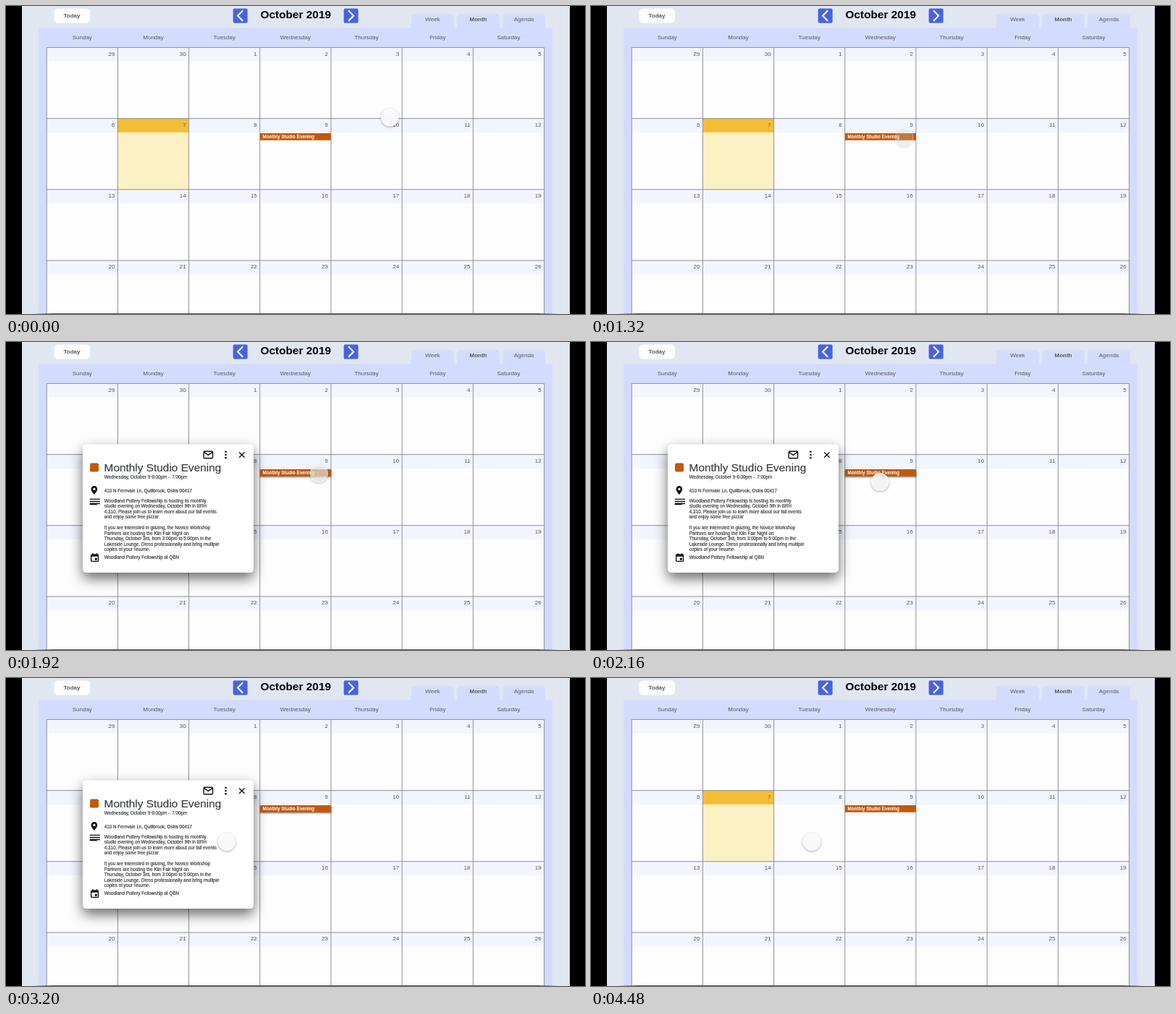
Animation of 800 by 426 pixels, one loop 4.52 s. Source, as an HTML page:

```html
<!DOCTYPE html>
<html lang="en">
<head>
<meta charset="utf-8">
<style>
  html, body { margin: 0; width: 100%; height: 100%; overflow: hidden; background: #000; }
  svg { display: block; width: 800px; height: 426px; font: 8px "Liberation Sans", Arial, sans-serif; }
  text { fill: #58585e; white-space: pre; }
  .mid { text-anchor: middle; }
  .end { text-anchor: end; }
  .bold { font-weight: bold; }
  #card { filter: drop-shadow(0 8px 9px rgba(0, 0, 0, .58)); }
  #card .small { font-size: 6.27px; fill: #333; stroke: #333; stroke-width: .16px; }
  #dot { filter: drop-shadow(0 1.5px 1.5px rgba(0, 0, 0, .35)); }
</style>
</head>
<body>
<svg viewBox="0 0 800 426">
  <defs>
    <linearGradient id="edge">
      <stop offset="0" stop-color="#555" stop-opacity="0"/>
      <stop offset=".04" stop-color="#555"/>
      <stop offset=".96" stop-color="#555"/>
      <stop offset="1" stop-color="#555" stop-opacity="0"/>
    </linearGradient>
  </defs>
  <rect x="22" width="757" height="426" fill="#e1e7f1"/>
  <rect x="45" y="30" width="710" height="396" fill="#d4dcfe"/>
  <rect x="66.5" y="3.5" width="49.5" height="20" rx="5" fill="#fdfdfd"/>
  <text class="mid bold" x="91" y="16">Today</text>
  <text class="mid bold" x="400.3" y="17.3" font-size="15.4" style="fill:#000">October 2019</text>
  <g id="nav"></g>
  <g id="grid"></g>
  <rect x="36" y="425" width="728" height="1" fill="url(#edge)"/>

  <rect id="lift" x="351" y="177.5" width="98.5" height="9.5" fill="#000" opacity=".35" style="filter:blur(1px)"/>
  <rect x="351" y="176" width="98" height="9.7" fill="#c1590c"/>
  <text class="bold" x="354.5" y="183" font-size="6.3" style="fill:#fff">Monthly Studio Evening</text>

  <g id="card">
    <rect x="106" y="141.5" width="236" height="177.5" rx="5" fill="#fff"/>
    <rect x="116" y="167.5" width="12" height="12" rx="2" fill="#c1590c"/>
    <text x="135.6" y="179" font-size="15.4" style="fill:#3c4043;stroke:#3c4043;stroke-width:.2px">Monthly Studio Evening</text>
    <g fill="none" stroke="#111" stroke-width="1.4">
      <rect x="273.2" y="151.2" width="12.4" height="9.6" rx="1"/>
      <path d="M273.5 152.4l5.9 4 5.9-4M322.2 152.4l7.4 7.4M329.6 152.4l-7.4 7.4"/>
      <path d="M115.7 217.4h14.3M115.7 220.5h14.3M115.7 223.5h14.3M115.7 226h0"/>
      <path d="M115.7 224.6h10"/>
      <rect x="117.7" y="294" width="9.8" height="9.4" rx="1"/>
      <path d="M117.5 295.4h10.2" stroke-width="2.6"/>
      <path d="M119.8 292.3v2M125.4 292.3v2"/>
    </g>
    <g fill="#111">
      <circle cx="303.5" cy="151.8" r="1.3"/>
      <circle cx="303.5" cy="156" r="1.3"/>
      <circle cx="303.5" cy="160.2" r="1.3"/>
      <rect x="122.8" y="298.7" width="3" height="3"/>
      <path fill-rule="evenodd" d="M121.9 211.2c-3-3.7-4.3-5.9-4.3-7.8a4.3 4.3 0 0 1 8.6 0c0 1.9-1.3 4.1-4.3 7.8zM120.3 203.4a1.6 1.6 0 0 0 3.2 0a1.6 1.6 0 0 0-3.2 0z"/>
    </g>
  </g>

  <circle id="dot" r="12.3" stroke="#fff" stroke-opacity=".55" stroke-width=".8"/>
</svg>
<script>
const $ = id => document.getElementById(id);
const rect = (x, y, w, h, fill, rx = 0) =>
  `<rect x="${x}" y="${y}" width="${w}" height="${h}" rx="${rx}" fill="${fill}"/>`;
const label = (x, y, text, cls = '') => `<text class="${cls}" x="${x}" y="${y}">${text}</text>`;

// Month arrows and view tabs
let nav = '';
for (const [x, dir] of [[323.7, -1], [476.7, 1]])
  nav += rect(x - 10, 3.5, 20, 20, '#4762e8', 2) +
    `<path d="M${x - 3.5 * dir} 6.2l${7 * dir} 7.3l${-7 * dir} 7.3" fill="none" stroke="#fff" stroke-width="2.2"/>`;
['Week', 'Month', 'Agenda'].forEach((name, i) => {
  const x = 560 + 63 * i;
  nav += rect(x, 11.5, 59, 24, '#d4dcfe', 4) + label(x + 29.5, 20.7, name, i === 1 ? 'mid bold' : 'mid');
});
$('nav').innerHTML = nav;

// Month grid
const LEFT = 56.2, TOP = 57.4, STEP = 98.2;
const days = ['Sunday', 'Monday', 'Tuesday', 'Wednesday', 'Thursday', 'Friday', 'Saturday'];
let grid = days.map((day, i) => label(LEFT + STEP * (i + .5), 46, day, 'mid')).join('');
for (let i = 0; i < 28; i++) {
  const x = LEFT + STEP * (i % 7), y = TOP + STEP * Math.floor(i / 7);
  const today = i === 8;
  grid += rect(x, y, STEP, STEP, today ? '#fdf1c4' : '#fdfdfd') +
    rect(x, y, STEP, 19.3, today ? '#f4be37' : '#f3f5fe') +
    label(x + 94.2, y + 11.3, i < 2 ? 29 + i : i - 1, 'end');
}
let lines = '';
for (let i = 0; i < 8; i++) lines += `M${LEFT + STEP * i} ${TOP}V426`;
for (let i = 0; i < 4; i++) lines += `M${LEFT} ${TOP + STEP * i}h${STEP * 7}`;
$('grid').innerHTML = grid + `<path d="${lines}" stroke="#85858e" stroke-width=".9"/>`;

// Card details
const details = [
  [189, 'Wednesday, October 9·6:00pm – 7:00pm'],
  [207.6, '410 N Fernvale Ln, Quillbrook, Ostra 00417'],
  [221.5, 'Woodland Pottery Fellowship is hosting its monthly'],
  [229, 'studio evening on Wednesday, October 9th in BRH'],
  [236.5, '4.310. Please join us to learn more about our fall events'],
  [244, 'and enjoy some free pizza!'],
  [259, 'If you are interested in glazing, the Novice Workshop'],
  [266.5, 'Partners are hosting the Kiln Fair Night on'],
  [274, 'Thursday, October 3rd, from 3:00pm to 5:00pm in the'],
  [281.5, 'Lakeside Lounge. Dress professionally and bring multiple'],
  [289, 'copies of your resume.'],
  [300.3, 'Woodland Pottery Fellowship at QBN'],
];
$('card').insertAdjacentHTML('beforeend', details.map(([y, text]) => label(135.8, y, text, 'small')).join(''));

const LOOP = 4520;
// Keys: time, then values
const path = [[0, 530.5, 154], [240, 530, 154], [400, 514, 158], [560, 484, 168], [720, 452, 178],
  [900, 437, 181.3], [1120, 433, 182], [1960, 432.5, 182], [2120, 413, 189], [2240, 373, 203],
  [2360, 322, 221], [2480, 306, 226.5], [2800, 305, 226.5], [LOOP, 305, 226.5]];
const touch = [[0, .95], [560, .95], [720, .62], [1160, .62], [1320, .22], [1640, .22],
  [1800, .62], [2000, .62], [2200, .95], [LOOP, .95]];
const popup = [[0, 0], [1600, 0], [1720, 1], [4160, 1], [4280, 0], [LOOP, 0]];

function at(keys, t) {
  const i = keys.findIndex(key => key[0] > t), a = keys[i - 1], b = keys[i];
  const k = (t - a[0]) / (b[0] - a[0]);
  return a.slice(1).map((v, j) => v + (b[j + 1] - v) * k);
}

function draw(now) {
  const t = Math.max(0, now) % LOOP;
  const [x, y] = at(path, t), [shown] = at(popup, t);
  $('dot').setAttribute('transform', `translate(${x} ${y})`);
  $('dot').setAttribute('fill', `rgba(253,253,253,${at(touch, t)[0]})`);
  $('card').setAttribute('opacity', shown);
  $('lift').setAttribute('opacity', .5 * shown);
  requestAnimationFrame(draw);
}
draw(performance.now());
</script>
</body>
</html>
```
